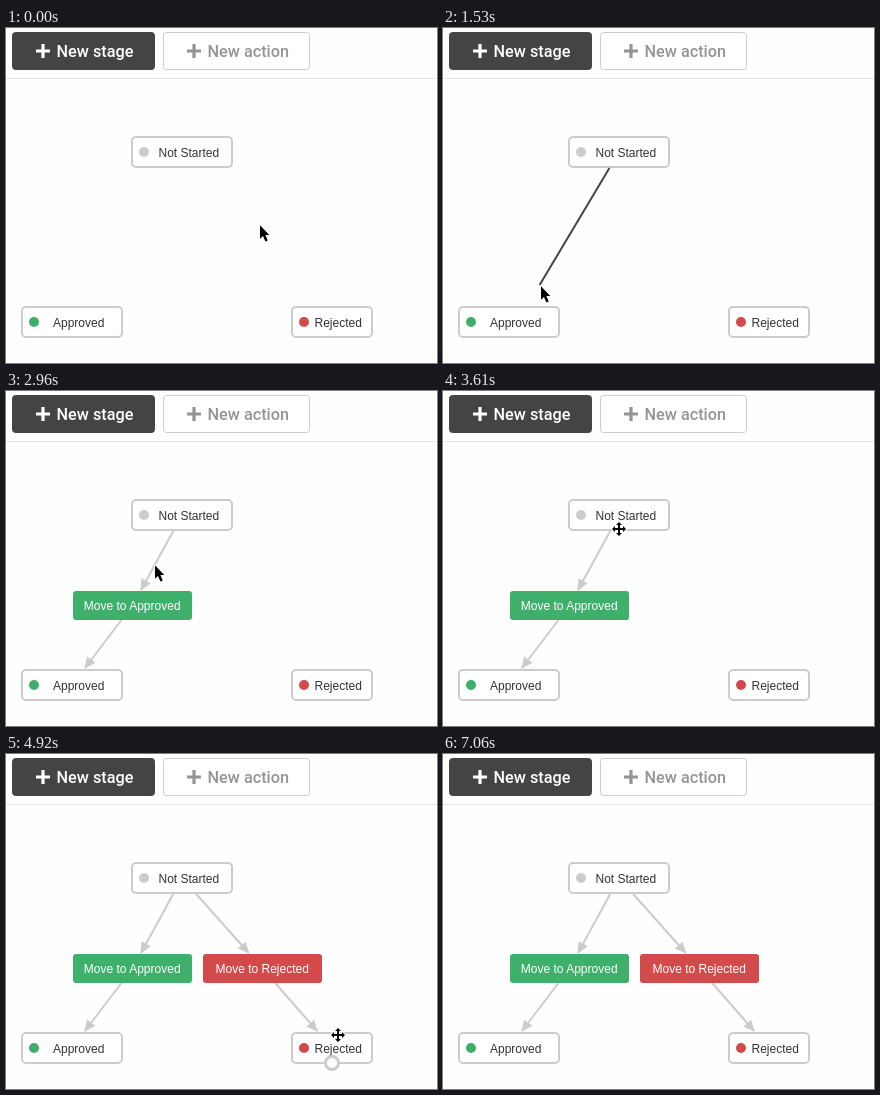
An HTML page for the animation above (7.66 s loop, 431 px wide and 335 px high).

```html
<!DOCTYPE html>
<html lang="en">
<head>
<meta charset="utf-8">
<title>Workflow editor</title>
<style>
  html, body { margin: 0; width: 100%; height: 100%; overflow: hidden; background: #fefefe; }
  svg { display: block; width: 431px; height: 335px; }
  .head { font: 500 16.25px Roboto, Inter, sans-serif; }
  .label { font: 12px "Liberation Sans", Arial, sans-serif; }
</style>
</head>
<body>
<svg id="stage" viewBox="0 0 431 335" xmlns="http://www.w3.org/2000/svg"></svg>
<script>
const LOOP = 7660;
const GREEN = '#3eb06b', RED = '#d34a4a', GREY = '#ccc', DARK = '#444';
const stage = document.getElementById('stage');

function add(tag, attrs, parent = stage, text) {
  const el = document.createElementNS('http://www.w3.org/2000/svg', tag);
  for (const key in attrs) el.setAttribute(key, attrs[key]);
  if (text) el.textContent = text;
  parent.appendChild(el);
  return el;
}
const set = (el, attrs) => { for (const key in attrs) el.setAttribute(key, attrs[key]); };
const show = (el, on) => el.setAttribute('visibility', on ? 'visible' : 'hidden');

// Boxes are described by their centre (x, y) and outer size (w, h).
const start = { x: 176, y: 124, w: 102, h: 32, label: 'Not Started', tx: 152.5, color: GREY };
const approved = { x: 66, y: 294, w: 102, h: 32, label: 'Approved', tx: 47, color: '#3fae6b' };
const rejected = { x: 326, y: 294, w: 82, h: 32, label: 'Rejected', tx: 308.5, color: RED };
const nodes = [start, approved, rejected];
const toApproved = { x: 126.5, y: 214.5, w: 119, h: 29, label: 'Move to Approved', color: GREEN };
const toRejected = { x: 256.5, y: 214.5, w: 119, h: 29, label: 'Move to Rejected', color: RED };

// Point where the line from the centre of a box towards p leaves the box.
function edge(box, p, gap = 0) {
  const dx = p.x - box.x, dy = p.y - box.y;
  const s = Math.min((box.w / 2 + gap) / Math.abs(dx || 1e-6), (box.h / 2 + gap) / Math.abs(dy || 1e-6), 1);
  return { x: box.x + dx * s, y: box.y + dy * s };
}

function inside(box, p, margin = 0) {
  return Math.abs(p.x - box.x) <= box.w / 2 + margin && Math.abs(p.y - box.y) <= box.h / 2 + margin;
}

function headButton(x, w, label, fill, stroke, ink) {
  add('rect', { x: x + .5, y: 4.5, width: w - 1, height: 37, rx: 3, fill, stroke });
  add('path', { d: `M${x + 24} 23h14m-7 -7v14`, stroke: ink, 'stroke-width': 3.2 });
  add('text', { x: x + 44.5, y: 29, class: 'head', fill: ink }, stage, label);
}

function arrow(from, to, parent) {
  const a = edge(from, to), b = edge(to, from, 1);
  const angle = Math.atan2(b.y - a.y, b.x - a.x) * 180 / Math.PI;
  add('path', { d: `M${a.x} ${a.y}L${b.x} ${b.y}`, stroke: GREY, 'stroke-width': 2 }, parent);
  add('path', { d: 'M1 0L-10.5 -5.2V5.2Z', fill: GREY, transform: `translate(${b.x} ${b.y}) rotate(${angle})` }, parent);
}

function action(box, target) {
  const g = add('g', {});
  arrow(start, box, g);
  arrow(box, target, g);
  add('rect', { x: box.x - box.w / 2, y: box.y - box.h / 2, width: box.w, height: box.h, rx: 3, fill: box.color }, g);
  add('text', { x: box.x - .3, y: 219, class: 'label', fill: '#fff', 'text-anchor': 'middle' }, g, box.label);
  return g;
}

function drawNode(n) {
  const left = n.x - n.w / 2, top = n.y - n.h / 2;
  n.glow = add('rect', { x: left - 2.5, y: top - 2.5, width: n.w + 5, height: n.h + 5, rx: 6, fill: '#c3e6d2' });
  add('rect', { x: left + 1, y: top + 1, width: n.w - 2, height: n.h - 2, rx: 4, fill: '#fff', stroke: GREY, 'stroke-width': 2 });
  add('circle', { cx: left + 13, cy: n.y, r: 5, fill: n.color });
  add('text', { x: n.tx, y: n.y + 5, class: 'label', fill: '#333' }, stage, n.label);
}

add('rect', { width: 431, height: 335, fill: '#fefefe' });
add('path', { d: 'M0 50.5H431', stroke: '#e4e4e4' });
headButton(6, 143, 'New stage', DARK, DARK, '#fff');
headButton(157, 147, 'New action', '#fff', GREY, '#949494');

const approveAction = action(toApproved, approved);
const rejectAction = action(toRejected, rejected);
nodes.forEach(drawNode);
const link = add('path', { stroke: DARK, 'stroke-width': 2 });
const handle = add('circle', { r: 6.5, fill: '#fff', stroke: GREY, 'stroke-width': 3 });

const outline = { fill: '#000', stroke: '#fff', 'stroke-width': 2, 'paint-order': 'stroke', 'stroke-linejoin': 'round' };
const pointer = add('path', { d: 'M1 1.3V14.8L4 11.9L6.4 17.4L8.7 16.4L6.4 11H10.3Z', ...outline });
const mover = add('path', {
  d: 'M0-7L3-4H1V-1H4V-3L7 0L4 3V1H1V4H3L0 7L-3 4H-1V1H-4V3L-7 0L-4-3V-1H-1V-4H-3Z', ...outline
});

// Each move: first and last step time, number of steps, first and last position.
const moves = [
  { t: [0, 0], n: 1, a: [253, 196], b: [253, 196] },
  { t: [60, 410], n: 7, a: [249, 193], b: [180, 136] },
  { t: [590, 710], n: 3, a: [178, 136], b: [174, 136] },
  { t: [1010, 1650], n: 12, a: [171, 149], b: [80, 281], drag: true, drop: 2000 },
  { t: [2480, 3200], n: 13, a: [86, 279], b: [170, 136], grab: true },
  { t: [3260, 3260], n: 1, a: [175, 137], b: [175, 137] },
  { t: [3610, 4020], n: 8, a: [176, 138], b: [330, 276], drag: true, drop: 4560, grab: true },
  { t: [4920, 5320], n: 8, a: [332, 281], b: [357, 212], grab: true },
  { t: [6940, 7060], n: 3, a: [375, 245], b: [437, 357] }
];
const ease = p => p * p * (3 - 2 * p);

function render(t) {
  const m = moves.filter(v => v.t[0] <= t).pop();
  const span = m.t[1] - m.t[0];
  const k = span ? Math.min(m.n - 1, Math.floor((t - m.t[0]) / span * (m.n - 1) + .02)) : 0;
  const p = m.n > 1 ? ease(k / (m.n - 1)) : 0;
  const pos = { x: m.a[0] + (m.b[0] - m.a[0]) * p, y: m.a[1] + (m.b[1] - m.a[1]) * p };

  const linking = m.drag && k > 0 && t < m.drop;
  const target = linking && [approved, rejected].find(n => inside(n, pos, 4));
  nodes.forEach(n => show(n.glow, n === target));
  show(link, linking);
  if (linking) {
    const from = edge(start, target || pos);
    const to = target ? edge(target, start) : pos;
    set(link, { d: `M${from.x} ${from.y}L${to.x} ${to.y}` });
  }

  const hover = !m.drag && nodes.find(n => inside(n, pos));
  show(handle, hover);
  if (hover) set(handle, { cx: hover.x, cy: hover.y + 15 });

  show(approveAction, t >= 2000);
  show(rejectAction, t >= 4560);

  const grabbing = m.grab && k === 0;
  const at = `translate(${Math.round(pos.x)} ${Math.round(pos.y)})`;
  set(pointer, { transform: at });
  set(mover, { transform: at });
  show(pointer, !grabbing);
  show(mover, grabbing);
}

let begin = null;
function tick(now) {
  if (begin === null) begin = now;
  render((now - begin) % LOOP);
  requestAnimationFrame(tick);
}
render(0);
requestAnimationFrame(tick);
</script>
</body>
</html>
```
